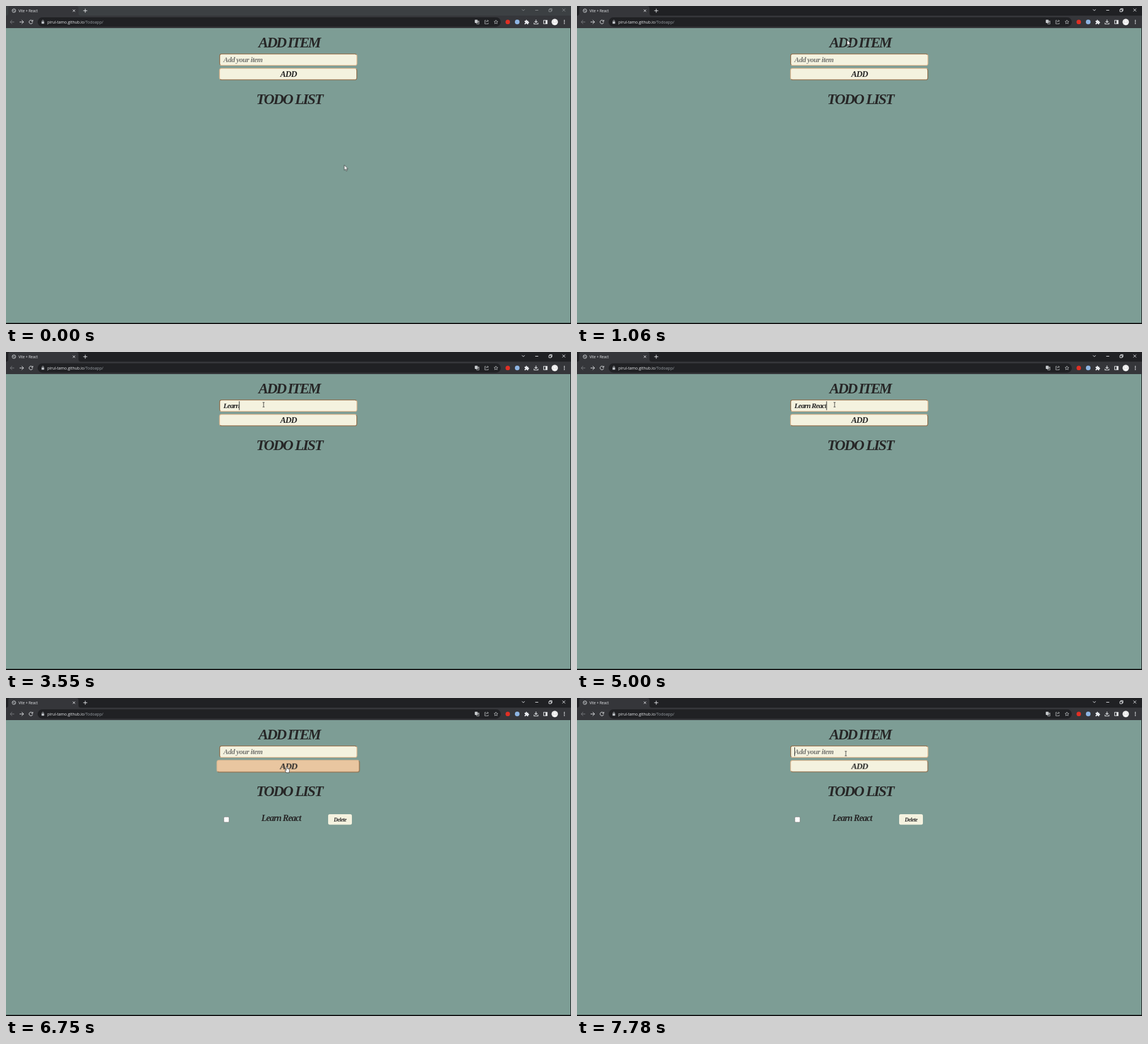
An HTML page for the animation above (8 s loop, 998 by 561 pixels).

```html
<!DOCTYPE html>
<html lang="en">
<head>
<meta charset="utf-8">
<title>Todo app</title>
<style>
html, body { margin: 0; width: 100%; height: 100%; overflow: hidden; background: #7d9d95; }
svg { display: block; width: 998px; height: 561px; }

/* every animation shares one 8 s timeline, 1% = 80 ms */
.a { animation: 8s step-end infinite; }

.ui { font-family: "Open Sans", sans-serif; font-size: 7px; fill: #e8eaed; }
.script { font-family: "Liberation Serif", serif; font-weight: bold; font-style: italic; fill: #272727; }
.h { font-size: 26px; }
.field { font-size: 13px; }
.icon { fill: none; stroke: #e8eaed; stroke-width: 1; }
.paper { fill: #f4f2df; }
.edge { fill: none; stroke-width: 1.3; }
.dark { stroke: #8d6844; }
.light { stroke: #e8bd93; }

.strip { fill: #202124; animation-name: strip; }
@keyframes strip { 0% { fill: #3c4043; } .875% { fill: #202124; } }
.controls { animation-name: controls; }
@keyframes controls { 0% { opacity: .45; } .875% { opacity: 1; } }

.typing { animation-name: typing; }
@keyframes typing {
  0% { transform: none; }
  34.5% { transform: translateX(6.8px); }
  37% { transform: translateX(11.5px); }
  40.25% { transform: translateX(17.3px); }
  42.75% { transform: translateX(21.5px); }
  44.375% { transform: translateX(27.6px); }
  50.125% { transform: translateX(30px); }
  53.375% { transform: translateX(37.6px); }
  55.875% { transform: translateX(42.6px); }
  58.375% { transform: translateX(48.2px); }
  60.875% { transform: translateX(53px); }
  62.5% { transform: translateX(56.4px); }
  84.375% { transform: none; }
}
.caret { animation-name: caret; }
@keyframes caret {
  0% { opacity: 0; }
  19.375% { opacity: 1; }
  26% { opacity: 0; }
  32.875% { opacity: 1; }
  69.125% { opacity: 0; }
  76% { opacity: 1; }
  82.625% { opacity: 0; }
  97.25% { opacity: 1; }
}
.hint { fill: #757570; animation-name: hint; }
@keyframes hint { 0% { opacity: 1; } 34.5% { opacity: 0; } 84.375% { opacity: 1; } }
.item { animation-name: item; }
@keyframes item { 0% { opacity: 0; } 84.375% { opacity: 1; } }

.button { transform-origin: 498.5px 120px; animation: grow 8s ease infinite; }
@keyframes grow {
  0%, 71% { transform: none; }
  75%, 91.25% { transform: scale(1.038); }
  95.5%, 100% { transform: none; }
}
.face { animation: press 8s ease infinite; }
@keyframes press {
  0%, 82.7% { fill: #f4f2df; }
  84%, 85.25% { fill: #e9c6a0; }
  86.2%, 100% { fill: #f4f2df; }
}

.pointer { animation: move 8s linear infinite; }
@keyframes move {
  0%, 8.6% { transform: translate(597.5px, 280.5px); }
  13.2%, 14.1% { transform: translate(477px, 60px); }
  18.5%, 19.4% { transform: translate(452px, 91px); }
  21.1%, 69.2% { transform: translate(455px, 93px); }
  72.5%, 88.6% { transform: translate(496px, 121px); }
  94.5%, 100% { transform: translate(474.8px, 98px); }
}
.arrow { animation-name: arrow; }
@keyframes arrow { 0% { opacity: 1; } 17.5% { opacity: 0; } }
.beam { animation-name: beam; }
@keyframes beam { 0% { opacity: 0; } 17.5% { opacity: 1; } 71% { opacity: 0; } 91.25% { opacity: 1; } }
.hand { animation-name: hand; }
@keyframes hand { 0% { opacity: 0; } 71% { opacity: 1; } 91.25% { opacity: 0; } }
</style>
</head>
<body>
<svg viewBox="0 0 998 561">
  <rect width="998" height="561" fill="#7d9d95"/>
  <path d="M997 39h1v522H0v-2h997z" fill="#111313"/>

  <!-- tab strip -->
  <rect class="a strip" width="998" height="18"/>
  <path d="M0 17Q4 17 4 13V4Q4 0 8 0H124Q128 0 128 4V13Q128 17 132 17H998V39H0Z" fill="#35363a"/>
  <g class="icon">
    <circle cx="14" cy="8.3" r="3.2" stroke="#c4c7ca"/>
    <path d="M11.3 7.2q2 0 2.3 1.6t2-.2l1.3.6M14 5.3l1 1.3" stroke="#c4c7ca"/>
    <path d="M118 6.3l4 4m0-4l-4 4M136.5 8.3h7m-3.5-3.5v7"/>
  </g>
  <text class="ui" x="22" y="10.6" style="font-size:6.3px">Vite + React</text>
  <g class="a controls">
    <path class="icon" stroke-width=".9" d="M911.3 5.8l2.5 2.5 2.5-2.5M934.8 7.5h5.4M959 6h4v4h-4zM960.4 6V4.7h4v4H963M982.8 4.6l5 5m0-5l-5 5"/>
  </g>

  <!-- toolbar -->
  <rect x="56" y="20" width="818" height="16.5" rx="8.2" fill="#202124"/>
  <path class="icon" style="stroke:#7d8084" d="M14.5 28.2h-7M10.8 24.8l-3.4 3.4 3.4 3.4"/>
  <g class="icon">
    <path d="M24 28.2h7M27.7 24.8l3.4 3.4-3.4 3.4"/>
    <path d="M46.6 26.3a3.2 3.2 0 1 0 .5 2.6M47.3 24.6v2.5h-2.5"/>
  </g>
  <rect x="62.8" y="27.3" width="4.6" height="4" rx=".6" fill="#bdc1c6"/>
  <path class="icon" style="stroke:#bdc1c6;stroke-width:.8" d="M63.8 27.5v-1.2a1.3 1.3 0 0 1 2.6 0v1.2"/>
  <text class="ui" x="73" y="30.8">pirul-tamo.github.io<tspan fill="#9aa0a6">/Todoapp/</tspan></text>

  <rect x="828" y="24.3" width="5" height="5.6" rx=".8" fill="#c4c7ca"/>
  <g class="icon" style="stroke:#c4c7ca;stroke-width:.8">
    <path d="M833.2 26.3h2.3v5.5h-4l-.6-1.8M832.8 28h2.4M834.2 27.6q-.3 1.8-1.8 2.8"/>
    <path d="M847.8 25.3h-2v6.2h6v-2M847.5 29q.3-2.8 3.5-2.8h1M850.3 24.4l1.8 1.8-1.8 1.8"/>
    <path d="M865.4 24.8l1 2.2 2.4.3-1.8 1.6.5 2.4-2.1-1.2-2.1 1.2.5-2.4-1.8-1.6 2.4-.3z"/>
  </g>
  <circle cx="886.3" cy="28.2" r="3.9" fill="#e02f24"/>
  <circle cx="903" cy="28.2" r="4.1" fill="#8db4e2"/>
  <path d="M916 26h2.1q-.4-1.8 1.1-1.8T920.300 26h2.2v2.100q1.500-.3 1.500 1.100t-1.500 1.100v2H920.200q0-1.500-1.200-1.500t-1.200 1.500H916v-2q1.300 0 1.300-1.200T916 27.900z" fill="#e8eaed"/>
  <g class="icon" style="stroke-width:1.1">
    <path d="M936.200 24v4.800M933.800 26.800l2.400 2.400 2.400-2.400M932.700 29.500v2.200h7v-2.200"/>
    <path d="M949.700 25.200h6.200v6h-6.200z"/>
  </g>
  <rect x="953" y="25" width="3" height="6.400" fill="#e8eaed"/>
  <circle cx="969.300" cy="28.200" r="5.700" fill="#e9e9e9"/>
  <circle cx="969.300" cy="26.800" r="1.700" fill="#fafafa"/>
  <path d="M965.800 31.700q3.500-4 7 0-3.500 2.600-7 0z" fill="#fafafa"/>
  <g fill="#e8eaed">
    <circle cx="986.300" cy="25.500" r=".9"/>
    <circle cx="986.300" cy="28.200" r=".9"/>
    <circle cx="986.300" cy="30.900" r=".9"/>
  </g>

  <!-- form -->
  <text class="script h" x="446" y="73" letter-spacing="-2.45">ADD ITEM</text>
  <text class="script h" x="442" y="172.500" letter-spacing="-1.95">TODO LIST</text>

  <rect class="paper" x="377.500" y="84.700" width="242.300" height="20" rx="3.500"/>
  <path class="edge light" d="M618.800 85.700Q619.800 86.700 619.800 88.200V101.200Q619.800 104.700 616.300 104.700H381Q379.500 104.700 378.500 103.700"/>
  <path class="edge dark" d="M378.500 103.700Q377.500 102.700 377.500 101.200V88.200Q377.500 84.700 381 84.700H616.300Q617.800 84.700 618.800 85.700"/>
  <text class="script field" x="384" y="99" letter-spacing="-.9">Learn React</text>
  <g class="a typing">
    <rect class="paper" x="383.500" y="86.500" width="80" height="17"/>
  </g>
  <text class="a script field hint" x="384" y="99" letter-spacing="-.52">Add your item</text>
  <g class="a typing">
    <rect class="a caret" x="384" y="87" width="1" height="15.500" fill="#222"/>
  </g>

  <g class="button">
    <rect class="face" x="377.300" y="110.200" width="242.300" height="20" rx="3.500"/>
    <path class="edge dark" d="M618.600 111.200Q619.600 112.200 619.600 113.700V126.700Q619.600 130.200 616.100 130.200H380.800Q379.300 130.200 378.300 129.200"/>
    <path class="edge light" d="M378.300 129.200Q377.300 128.200 377.300 126.700V113.700Q377.300 110.200 380.800 110.200H616.100Q617.600 110.200 618.600 111.200"/>
    <text class="script" x="484.500" y="125.300" font-size="15" letter-spacing="-.9">ADD</text>
  </g>

  <!-- list -->
  <g class="a item">
    <rect x="384.800" y="209.800" width="9.200" height="9.400" rx="1.500" fill="#fff" stroke="#767676" stroke-width=".8"/>
    <text class="script" x="451" y="216.500" font-size="16" letter-spacing="-1.03">Learn React</text>
    <rect class="paper" x="569" y="205" width="42" height="18.500" rx="3"/>
    <text class="script" x="579" y="217.500" font-size="9.500" letter-spacing="-.4">Delete</text>
  </g>

  <g class="pointer">
    <path class="a arrow" d="M0 0V9.200L2.100 7.300L3.600 10.600L5.100 9.900L3.700 6.800H6.500Z" fill="#fff" stroke="#222" stroke-width=".7"/>
    <path class="a beam" d="M-1.700-4H1.700M0-4V4M-1.700 4H1.700" fill="none" stroke="#333" stroke-width=".9"/>
    <path class="a hand" d="M-1 5V.6Q0-.6 1 .6V3.600L4 4.300Q5 4.700 4.800 6L4 10.800H-.8L-3.200 7Q-3.200 5.600-2 6L-1 7Z" fill="#fff" stroke="#222" stroke-width=".7"/>
  </g>
</svg>
</body>
</html>
```
